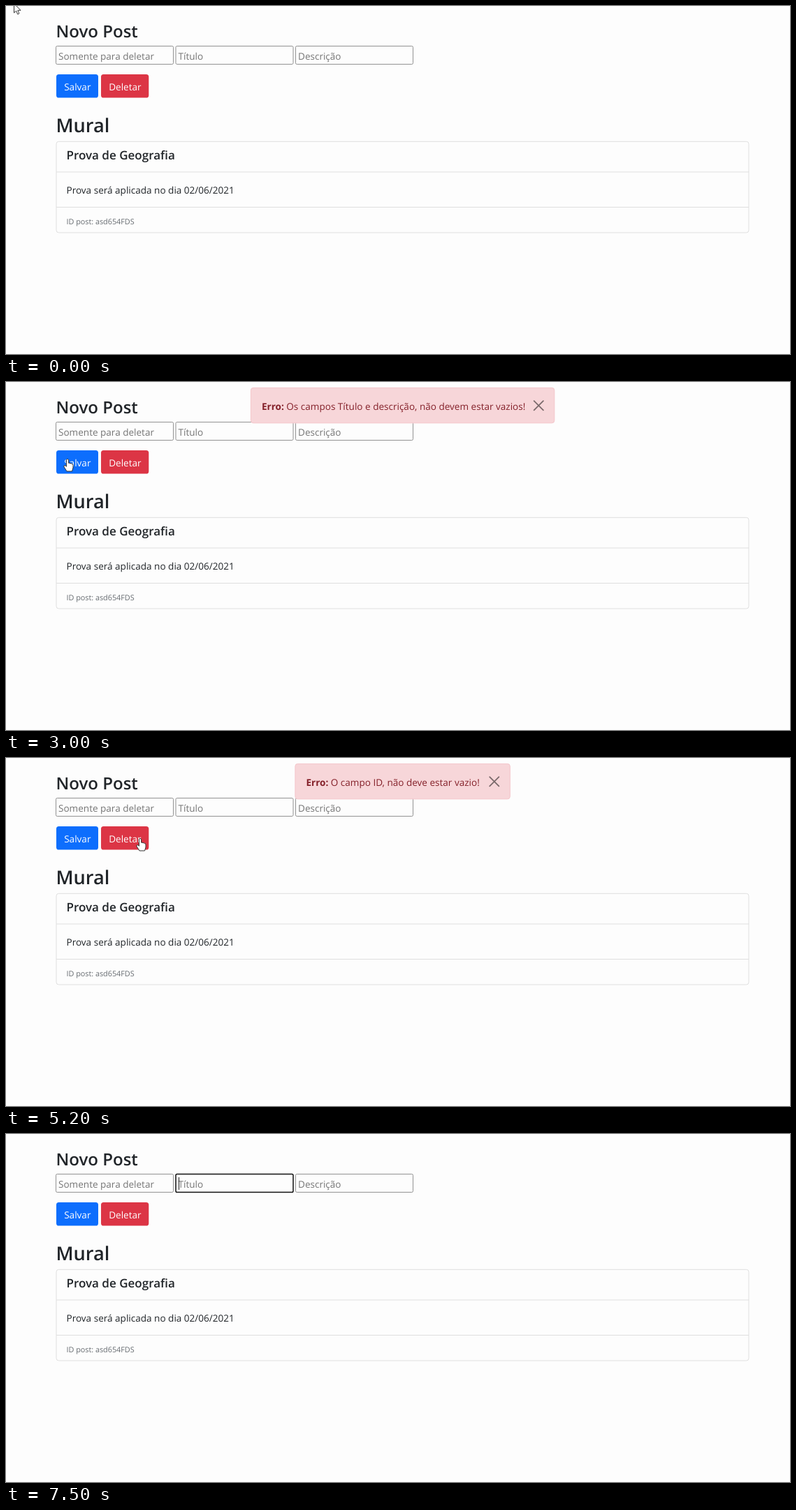
Recreate the animation shown at these times as an HTML page. Size 1122 by 499 pixels, loop 8000 ms.

```html
<!DOCTYPE html>
<html lang="pt">
<head>
<meta charset="utf-8">
<title>Mural</title>
<style>
  html, body { margin: 0; width: 100%; height: 100%; overflow: hidden; background: #fdfdfd; }
  svg { display: block; width: 100%; height: 100%; }
  text { font: 13.55px "Open Sans", sans-serif; fill: #212529; text-rendering: geometricPrecision; white-space: pre; }
  .h { font-weight: 600; }
  .white { fill: #fff; }
  .hint { fill: #757575; }
  .field { fill: #fdfdfd; stroke: #929292; }
  .field.focus { stroke: #101010; stroke-width: 1.5; }
  .card { fill: none; stroke: #dfdfdf; }
  .alert rect { fill: #f7d6d9; stroke: #f4c5ca; }
  .alert text { fill: #842029; }
  .alert .ring { fill: none; stroke: #0d6efd; stroke-opacity: .25; stroke-width: 3.6; }
  .alert path { stroke: #000; stroke-width: 1.8; stroke-linecap: round; }
  .cursor { fill: #fff; stroke: #333; stroke-linejoin: round; }
</style>
</head>
<body>
<svg viewBox="0 0 1122 499">
  <text class="h" x="71.5" y="45" style="font-size:24px">Novo Post</text>
  <g id="fields"></g>
  <path id="caret" d="M247.5 62V80" stroke="#222"/>
  <g id="buttons"></g>
  <text class="h" x="71.5" y="181" style="font-size:27.2px">Mural</text>
  <path class="card" d="M72 238H1063M72 288.5H1063"/>
  <rect class="card" x="72" y="194.3" width="991" height="130.7" rx="3.6"/>
  <text class="h" x="86.5" y="220" style="font-size:17px">Prova de Geografia</text>
  <text x="86.5" y="269">Prova será aplicada no dia 02/06/2021</text>
  <text x="86.5" y="313" style="font-size:10.8px;fill:#666b70">ID post: asd654FDS</text>
  <g id="alerts"></g>
  <path class="cursor" id="arrow" d="M.5.5V13.8L3.6 11L5.7 15.8L7.9 14.8L5.8 10.2H10Z"/>
  <path class="cursor" id="hand" d="M-1.6 1.4Q0-.6 1.6 1.4V6.3Q3.2 5.4 4 6.9Q5.7 6 6.3 7.7Q8 7.3 8 9V13L6.5 18H-1L-5 11.7Q-5.4 9-3.1 9.7L-1.6 11.3Z"/>
</svg>
<script>
const LOOP = 8000, STEP = 100;
const $ = id => document.getElementById(id);
const show = (el, on) => { el.style.display = on ? '' : 'none'; };
const within = (t, from, to) => t >= from && t < to;
const zone = (x, y, w, h) => ({ x, y, w, h });
const inside = ([x, y], z) => within(x, z.x, z.x + z.w) && within(y, z.y, z.y + z.h);
const spot = (z, fx = .5, fy = .5) => [z.x + z.w * fx, z.y + z.h * fy];
const box = (z, attrs) => `<rect x="${z.x}" y="${z.y}" width="${z.w}" height="${z.h}" ${attrs}/>`;

const hints = ['Somente para deletar', 'Título', 'Descrição'];
const fieldZones = hints.map((_, i) => zone(71.5 + 171.5 * i, 57.5, 168, 26));
const [idField, titleField] = fieldZones;
$('fields').innerHTML = hints.map((hint, i) => box(fieldZones[i], 'class="field" rx="1.8"') +
  `<text class="hint" x="${fieldZones[i].x + 3.5}" y="76.5">${hint}</text>`).join('');
const fields = document.querySelectorAll('.field');

const save = zone(72, 98, 60, 33.5), remove = zone(136, 98, 68.3, 33.5);
const button = (z, label) => box(z, 'rx="3.6"') +
  `<text class="white" x="${z.x + 11.2}" y="121">${label}</text>`;
$('buttons').innerHTML = button(save, 'Salvar') + button(remove, 'Deletar');
const [saveRect, removeRect] = document.querySelectorAll('#buttons rect');

function makeAlert(width, shown, fade, message) {
  const z = zone(567.6 - width / 2, 8.3, width, 50.5);
  const right = z.x + width, cx = right - 22.5;
  const el = document.createElementNS('http://www.w3.org/2000/svg', 'g');
  el.setAttribute('class', 'alert');
  el.innerHTML = box(z, 'rx="3.6"') +
    `<text x="${z.x + 15.5}" y="39.5"><tspan font-weight="700">Erro:</tspan> ${message}</text>` +
    box(zone(cx - 22, 7.3, 44.4, 52.4), 'class="ring" rx="4"') +
    `<path d="M${cx - 6.6} 27.2l13.2 13.2m0-13.2l-13.2 13.2"/>`;
  const [ring, cross] = el.querySelectorAll('.ring, path');
  $('alerts').append(el);
  return { el, ring, cross, shown, fade,
    close: zone(cx - 19.5, 8, 42, 51), text: zone(z.x + 15, 24, width - 60, 18) };
}
const alerts = [
  makeAlert(434.4, 2900, 4200, 'Os campos Título e descrição, não devem estar vazios!'),
  makeAlert(307.4, 5200, 7000, 'O campo ID, não deve estar vazio!')
];
const textZones = [zone(72, 153, 75, 16), ...fieldZones];

// Each move eases the pointer to a point between two times; it rests in between.
const moves = [
  { from: 0, to: 400, at: [356, 104] },
  { from: 500, to: 1000, at: [135, 199] },
  { from: 1200, to: 1400, at: [118, 165] },
  { from: 1500, to: 2300, at: spot(idField) },
  { from: 2400, to: 2800, at: spot(save, .27, .36) },
  { from: 3100, to: 3800, at: spot(alerts[0].close, .54, .59) },
  { from: 4200, to: 4800, at: spot(remove, .82) },
  { from: 5200, to: 5600, at: [508, 42] },
  { from: 5900, to: 6200, at: [678, 43] },
  { from: 6400, to: 6500, at: spot(alerts[1].close) },
  { from: 6900, to: 7200, at: spot(titleField) }
];
function pointerAt(t) {
  let [x, y] = [11, -4];
  for (const { from, to, at } of moves) {
    const k = Math.min(1, Math.max(0, (t - from) / (to - from)));
    const ease = k * k * (3 - 2 * k);
    x += (at[0] - x) * ease;
    y += (at[1] - y) * ease;
  }
  return [Math.round(x), Math.round(y)];
}

function draw(t) {
  const pointer = pointerAt(t);
  const over = z => inside(pointer, z);
  let hand = [save, remove].some(over), hidden = textZones.some(over);

  for (const a of alerts) {
    const visible = within(t, a.shown, a.fade + 2 * STEP);
    show(a.el, visible);
    if (!visible) continue;
    const hover = over(a.close);
    hand ||= hover;
    hidden = !hover && (hidden || over(a.text));
    a.el.style.opacity = t < a.fade ? 1 : t < a.fade + STEP ? .84 : .25;
    a.cross.style.opacity = hover ? 1 : .5;
    show(a.ring, t >= a.fade - STEP);
  }

  fields[0].classList.toggle('focus', within(t, 2300, 2500));
  fields[1].classList.toggle('focus', t >= 7500);
  show($('caret'), t >= 7500);
  saveRect.setAttribute('fill', within(t, 2800, 2900) ? '#0b5ed7' : '#0d6efd');
  removeRect.setAttribute('fill', within(t, 5000, 5200) ? '#bb2d3b' : '#dc3545');

  for (const [id, on] of [['arrow', !hand && !hidden], ['hand', hand]]) {
    show($(id), on);
    $(id).setAttribute('transform', `translate(${pointer})`);
  }
}

const start = performance.now();
function tick() {
  const t = (performance.now() - start) % LOOP;
  draw(Math.floor(t / STEP) * STEP);
  requestAnimationFrame(tick);
}
tick();
</script>
</body>
</html>
```
